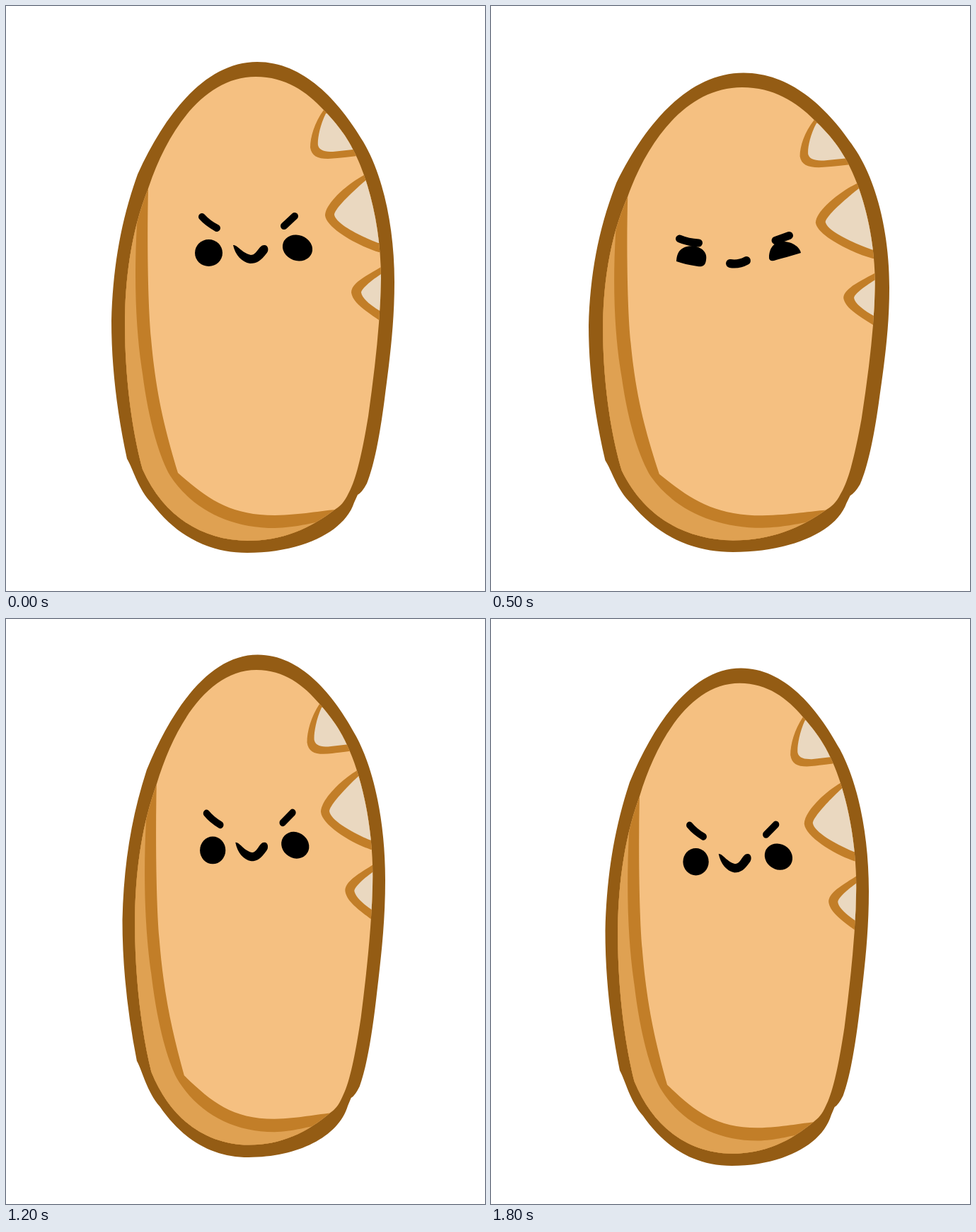
An HTML page that plays this animation: 677 by 827 pixels, repeating every 2100 ms.

```html
<!DOCTYPE html>
<html>
<head>
<meta charset="utf-8">
<title>Bouncing bread</title>
<style>
html, body { margin: 0; width: 100%; height: 100%; overflow: hidden; background: #fff; }
svg { display: block; width: 677px; height: 827px; }
.line { fill: none; stroke: #000; stroke-linecap: round; }
.crust { fill: #c27e28; }
.cut { fill: #ead8c0; }
</style>
</head>
<body>
<svg viewBox="0 0 677 827">
  <defs>
    <path id="inner" d="M353 100C395 100 425 121 449 147C471 170 482 186 491 204C513 246 530 315 530 385C529 450 521 515 512 580C505 622 497 662 487 683L484 689C478 702 472 707 466 711C430 739 390 756 341 756C275 755 222 720 193 655C178 600 168 525 168 450C168 390 176 320 201 258C228 176 280 100 353 100Z"/>
    <clipPath id="inside"><use href="#inner"/></clipPath>
  </defs>

  <g id="body">
    <path fill="#945c14" d="M355 79C420 79 470 133 505 192C532 238 549 310 549 390C549 455 541 508 535 556C528 610 520 650 510 675Q503 688 497 691L492 702C478 745 415 773 341 773C285 773 240 748 206 703C186 682 180 655 171 640C157 575 149 510 149 445C151 370 162 305 186 238C226 150 283 79 355 79Z"/>
    <use href="#inner" fill="#f5c081"/>
    <g clip-path="url(#inside)">
      <!-- shaded side -->
      <path class="crust" d="M201 250V258C199 340 201 430 205 470C212 550 225 600 243 660C283 695 315 720 380 720C420 719 440 714 475 711V800H100V250Z"/>
      <path fill="#dfa152" d="M186 300L185 309C180 400 185 470 193 520C202 590 218 640 232 664C262 710 315 738 380 738C410 737 425 732 445 729V800H100V300Z"/>
      <!-- scored cuts -->
      <path class="crust" d="M449 147C436 165 430 185 430 200C432 212 440 216 455 216C475 215 485 213 496 212H600V100Z"/>
      <path class="cut" d="M452 152C443 170 440 190 441 197C443 205 452 206 462 206L490 203H600V100Z"/>
      <path class="crust" d="M506 239C480 253 451 280 451 296C453 315 500 340 527 348H600V200Z"/>
      <path class="cut" d="M509 246C490 262 464 287 464 295C466 308 500 325 526 335H600V200Z"/>
      <path class="crust" d="M530 369C508 382 488 392 488 405C490 420 510 432 530 446H600V369Z"/>
      <path class="cut" d="M530 379C515 389 502 400 502 405C503 413 515 423 530 432H600V379Z"/>
    </g>
  </g>

  <g id="smirk" class="face">
    <path class="line" stroke-width="10" d="M277 298Q285 307 298 314M408 297L393 311"/>
    <ellipse cx="286.5" cy="349" rx="19.5" ry="19"/>
    <ellipse cx="412" cy="342" rx="21.5" ry="18" transform="rotate(20 412 342)"/>
    <path d="M321 338C328 338 333 349 346 352C355 352 357 338 365 338C371 338 372 346 368 350C360 360 355 364 345 364C333 362 324 352 321 338Z"/>
  </g>

  <g id="sad" class="face">
    <path class="line" stroke-width="12" d="M307 309Q316 305.5 328.5 304.5"/>
    <path class="line" stroke-width="14" d="M432 309Q442 310 455.5 314"/>
    <ellipse cx="317" cy="349" rx="20" ry="18.5"/>
    <ellipse cx="442.5" cy="352" rx="21.5" ry="18" transform="rotate(15 442 352)"/>
    <circle cx="376" cy="362" r="8"/>
  </g>

  <g id="blink" class="face">
    <path class="line" stroke-width="11" d="M266.5 329Q278 334 293.5 335M402 331.5L421.5 324.5"/>
    <path d="M262 361C263 345 270 340 285 339C300 341 306 350 304 359C303 368 298 369 292 368C280 366 270 364 262 361Z"/>
    <path d="M393 356C393 340 402 333 413 333C427 333 437 342 438 349C425 353 410 357 400 360Q393 361 393 356Z"/>
    <path class="line" stroke-width="12" d="M338 364Q350 366 361 360"/>
  </g>

  <g id="laugh" class="face">
    <path d="M271 334C270 328 278 328 281 333L299 354C302 361 301 368 293 368C280 364 265 357 261 352C258 346 266 342 271 344L283 348C276 342 272 338 271 334Z"/>
    <path d="M414 325C415 320 408 319 404 324C400 331 395 342 394 353C396 359 399 359 402 358C412 355 428 350 434 343C437 336 433 331 426 332C420 332 414 336 410 339C412 335 414 330 414 325Z"/>
    <path d="M317 355C318 350 324 350 330 350C345 349 355 346 362 347C369 348 370 354 369 357C365 370 354 379 341 379C326 378 316 366 317 355Z"/>
    <path fill="#f7ead0" d="M326 361C340 361 350 358 359 354C357 364 350 370 341 370.5C333 370 328 366 326 361Z"/>
  </g>
</svg>
<script>
const LOOP = 2100;
const body = document.getElementById('body');
const faces = [...document.querySelectorAll('.face')];

// Matrix that fits the resting bread into the given box.
function fit(left, top, right, bottom) {
  const sx = (right - left) / 400, sy = (bottom - top) / 694;
  return `matrix(${sx} 0 0 ${sy} ${left - 149 * sx} ${top - 79 * sy})`;
}

const rest = fit(149, 79, 549, 773);
const tilt = 'matrix(1 .098 -.0885 .997 60.6 -26.8)';
const squash = fit(138, 94.5, 563, 772);
const deep = fit(132.5, 94, 567, 774);
const land = fit(136, 94, 559, 774);
const tall = fit(164, 62, 536, 773);
const hop = fit(164.5, 50.5, 536, 761);
const slim = fit(161.5, 69.5, 534, 773);

// Start time, body pose, face; the smirk moves with the body.
const poses = [
  [0, rest, 'smirk'],
  [200, squash, 'blink'],
  [300, tilt, 'sad'],
  [500, squash, 'blink'],
  [600, slim, 'smirk'],
  [700, rest, 'smirk'],
  [900, deep, 'laugh'],
  [1000, tall, 'smirk'],
  [1200, hop, 'smirk'],
  [1300, land, 'laugh'],
  [1400, slim, 'smirk'],
  [1600, hop, 'smirk'],
  [1700, land, 'laugh'],
  [1800, slim, 'smirk']
];

function draw() {
  const time = performance.now() % LOOP;
  const [, pose, name] = poses.findLast(([start]) => start <= time);
  body.setAttribute('transform', pose);
  for (const face of faces) {
    face.style.display = face.id === name ? '' : 'none';
    if (face.id === 'smirk') face.setAttribute('transform', pose);
  }
  requestAnimationFrame(draw);
}
draw();
</script>
</body>
</html>
```
